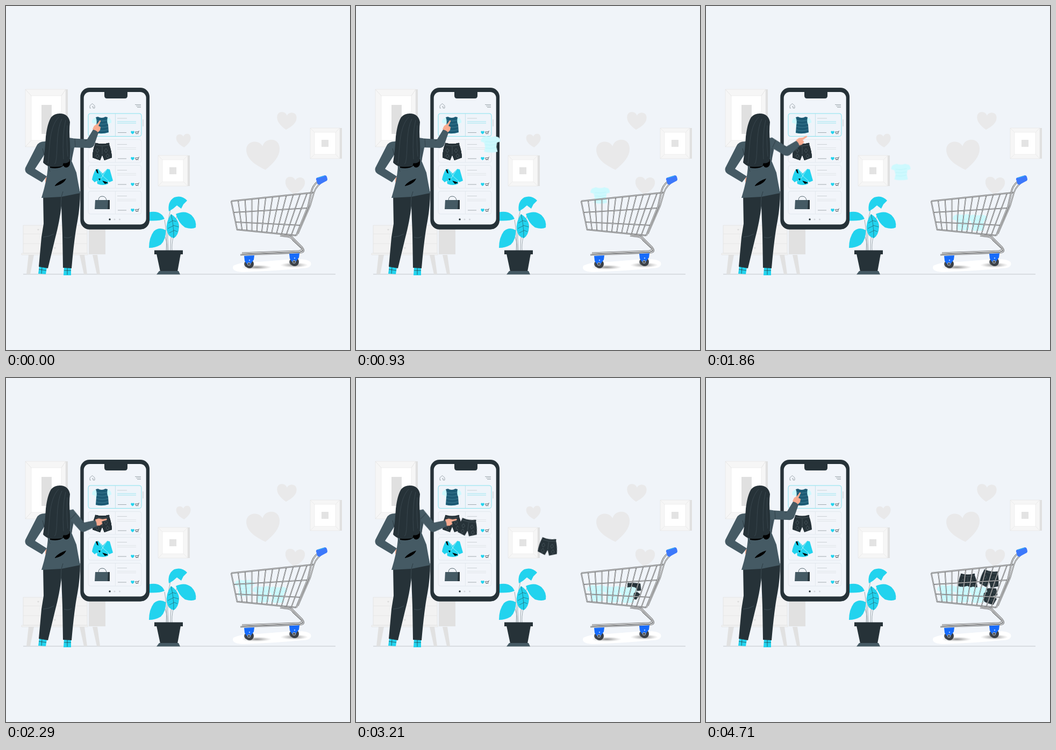
Write an HTML page that moves like this. It is 640x640 px and loops after 6000 ms.

```html
<!DOCTYPE html>
<html lang="en">
<head>
<meta charset="utf-8">
<title>Shopping</title>
<style>
html, body { margin: 0; width: 100%; height: 100%; overflow: hidden; background: #f0f4f9; }
svg { display: block; width: 100vw; height: 100vh; }
.fly, #arm { animation: 6s linear infinite; }
#arm { animation-name: reach; transform-origin: 124px 252px; }
#shirtA { animation-name: shirtA; }
#shirtB { animation-name: shirtB; }
#shirtC { animation-name: shirtC; }
#shortsA { animation-name: shortsA; }
#shortsB { animation-name: shortsB; }
#shortsC { animation-name: shortsC; }

@keyframes reach {
  0%, 19.83% { transform: rotate(0deg); }
  38.33%, 56.67% { transform: rotate(47deg); }
  78.5%, 100% { transform: rotate(0deg); }
}
@keyframes shirtA {
  0% { transform: translate(178px, 222px); }
  5.7% { transform: translate(249px, 256px); }
  10.67% { transform: translate(335px, 295px); }
  14.03% { transform: translate(418px, 336px); }
  15.5% { transform: translate(454px, 352px); }
  22%, 100% { transform: translate(505px, 403px); }
}
@keyframes shirtB {
  0%, 9.8% { transform: translate(178px, 222px); }
  15.5% { transform: translate(250px, 257px); }
  20.47% { transform: translate(335px, 295px); }
  23.83% { transform: translate(418px, 336px); }
  31%, 100% { transform: translate(477px, 402px); }
}
@keyframes shirtC {
  0%, 19.23% { transform: translate(178px, 222px); }
  24.93% { transform: translate(249px, 256px); }
  29.9% { transform: translate(335px, 295px); }
  33.27% { transform: translate(418px, 336px); }
  39.07%, 100% { transform: translate(448px, 400px); }
}
@keyframes shortsA {
  0%, 38.83% { transform: translate(179px, 271px); }
  41.17% { transform: translate(208px, 278px) rotate(8deg); }
  47.33% { transform: translate(357px, 314px) rotate(8deg); }
  49.5% { transform: translate(409px, 325px); }
  53.5% { transform: translate(516px, 395px) rotate(-75deg) scale(.86); }
  54.8%, 100% { transform: translate(528px, 405px) rotate(-80deg) scale(.86); }
}
@keyframes shortsB {
  0%, 45% { transform: translate(179px, 271px); }
  47.33% { transform: translate(208px, 278px) rotate(8deg); }
  53.5% { transform: translate(357px, 314px) rotate(8deg); }
  55.67% { transform: translate(409px, 325px); }
  60%, 100% { transform: translate(487px, 380px); }
}
@keyframes shortsC {
  0%, 51.17% { transform: translate(179px, 271px); }
  53.5% { transform: translate(208px, 278px) rotate(8deg); }
  59.67% { transform: translate(357px, 314px) rotate(8deg); }
  61.83% { transform: translate(409px, 325px); }
  64.33% { transform: translate(474px, 341px); }
  67.5%, 100% { transform: translate(528px, 374px) rotate(9deg); }
}
</style>
</head>
<body>
<svg viewBox="0 0 640 640">
  <defs>
    <path id="heart" d="M0 9C-6 5-10 1-10-4C-10-8-7.500-9.500-5-9.500C-2.500-9.500-.8-8 0-6C.8-8 2.500-9.500 5-9.500C7.500-9.500 10-8 10-4C10 1 6 5 0 9Z"/>
    <g id="shirt">
      <path fill="#cdf9fe" d="M-8-15Q0-12 8-15L15-13Q18-10 18-5L12-3L11 5L13 14Q0 17-12 14L-10 5L-12-3L-18-5Q-18-11-14-13Z"/>
      <path fill="none" stroke="#b4f1f8" stroke-width=".6" d="M-10-5Q0-3 11-6M-10 1Q0 3 11 0M-10 7Q0 9 11 6"/>
    </g>
    <g id="shorts">
      <path fill="#263238" d="M-13-15Q-14-17-11-16Q0-13 11-16Q14-17 13-13Q17-3 18 11L4 16L0 6L-4 16L-18 11Q-18-2-13-15Z"/>
      <path fill="none" stroke="#75848b" stroke-width=".4" d="M-12-12Q0-9 12-12M0-9L0 5M-9-6l3 4-3 4-3-4zM-9 4l3 4-3 4-3-4zM7-6l3 4-3 4-3-4zM10 4l3 4-3 4-3-4z"/>
    </g>
    <g id="frame">
      <path fill="#e0e0e0" d="M54 0h5v57h-5z"/>
      <path fill="#f6f6f6" stroke="#e6e6e6" stroke-width=".7" d="M0 0h55v57h-55z"/>
      <path fill="none" stroke="#e6e6e6" stroke-width=".7" d="M0 0l55 57M55 0L0 57"/>
      <path fill="#fff" stroke="#ebebeb" stroke-width=".7" d="M8 8h39v41h-39z"/>
      <path fill="#e3e3e3" d="M21 22h13v13h-13z"/>
    </g>
    <radialGradient id="shade">
      <stop offset="0" stop-color="#666" stop-opacity=".75"/><stop offset="1" stop-color="#999" stop-opacity="0"/>
    </radialGradient>
  </defs>

  <!-- room -->
  <path fill="#e0e0e0" d="M110 155h5v108h-5z"/>
  <path fill="#f6f6f6" stroke="#e6e6e6" stroke-width=".7" d="M36 155h75v107h-75z"/>
  <path fill="none" stroke="#e0e0e0" stroke-width=".8" d="M36 155l11 12M111 155l-8 12M36 262l11-12M111 262l-8-12"/>
  <path fill="#fff" stroke="#e8e8e8" stroke-width=".7" d="M47 167h56v83h-56z"/>
  <path fill="#e0e0e0" d="M66 184h19v54h-19z"/>
  <use href="#frame" x="283" y="278"/>
  <use href="#frame" x="566" y="227"/>
  <g fill="#e9e9ea">
    <use href="#heart" transform="translate(330.500 251) rotate(-4) scale(1.35)"/>
    <use href="#heart" transform="translate(522 214.500) rotate(4) scale(1.82 1.75)"/>
    <use href="#heart" transform="translate(479.500 278.500) rotate(-7) scale(3.100 2.950)"/>
    <use href="#heart" transform="translate(537.500 335) rotate(4) scale(1.820 1.750)"/>
  </g>
  <path stroke="#d2d6db" stroke-width="1.300" d="M32 499H613"/>
  <path fill="#e1e1e1" d="M154 408h31v54h-31zM42 463h10l-7 36h-7zM137 463h9l5 36h-6zM161 463h9l5 36h-6z"/>
  <path fill="#f2f2f2" stroke="#e2e2e2" stroke-width=".8" d="M29 460h123v3h-123zM32 408h119v52h-119zM32 424h119M32 442h119"/>
  <g fill="#dcdcdc"><circle cx="60" cy="416" r="1.600"/><circle cx="91" cy="450" r="1.600"/></g>

  <!-- plant -->
  <path fill="none" stroke="#6a777e" stroke-width=".6" d="M295 398Q300 425 298 455M306 378Q298 410 302 455M318 391Q305 420 306 455M311 430Q308 445 309 455M293 424Q300 435 300 455"/>
  <g fill="#22d3ee">
    <path d="M303 382Q300 364 313 356Q327 351 337 362L330 369L326 377L318 371Q311 378 303 382Z"/>
    <path d="M316 387Q333 379 345 389Q355 399 353 412Q346 416 333 412Q321 404 316 387Z"/>
    <path d="M262 385Q272 381 283 384Q291 387 295 396Q284 401 262 399Z"/>
    <path d="M266 450Q266 431 275 419Q285 410 297 417Q298 434 288 444Q278 450 266 450Z"/>
    <path d="M307 387Q322 397 322 411Q321 427 312 432Q301 429 299 417Q297 402 307 387Z"/>
  </g>
  <path fill="none" stroke="#263238" stroke-width=".5" d="M307 388Q312 405 312 431M309 399l8 2M309 400l-7 4M311 408l10 3M311 409l-10 5M312 417l7 3M312 418l-8 4"/>
  <path fill="#263238" d="M276 454.500h53v7.500h-53zM280 461h45l-6 33h-32z"/>
  <path fill="#455a64" d="M285 493h36l3 6.500h-44z"/>

  <!-- phone -->
  <rect x="138.300" y="152" width="128.700" height="263.700" rx="17" fill="#263238"/>
  <rect x="144.700" y="160" width="116" height="246.500" rx="11" fill="#f1f5fa"/>
  <path fill="#263238" d="M183 159h43v8q0 5-5 5h-33q-5 0-5-5z"/>
  <path fill="none" stroke="#7b878d" stroke-width=".7" d="M158 190h-2v-4.500l4.500-4 4.500 4v4.500h-3v-3h-2M240 183.500h11M242 186h9M244 188.500h7"/>
  <path stroke="#cdd3d9" stroke-width="1.500" d="M255 211v13"/>
  <g id="cards"></g>
  <circle cx="193" cy="397" r="1.700" fill="#263238"/>
  <g fill="#d4d8de"><circle cx="202" cy="397" r="1.600"/><circle cx="211.500" cy="397" r="1.600"/></g>

  <use href="#shorts" x="179" y="271"/>
  <path fill="#22d3ee" d="M172 303L180 312L188 303L193 304L199 325L192 328L190 325L190 331Q180 335 170 331L169 325L165 328L160 323Q162 312 167 304Z"/>
  <path fill="none" stroke="#fff" stroke-width=".6" d="M172 303L181 317L190 325M188 303L178 319L170 327"/>
  <path d="M167 304l3 0 2 8-3-2zM179 325l7 2 4 2-6 2zM172 321h4l-2 4z"/>
  <path fill="none" stroke="#5d6d75" stroke-width="1" d="M172 362Q172 354 179 354Q186 354 187 362"/>
  <path fill="#455a64" d="M166 361h25v17h-26z"/><path fill="#263238" d="M190 361h3v17h-4z"/>

  <!-- travelling clothes -->
  <use href="#shorts" id="shortsA" class="fly"/>
  <use href="#shorts" id="shortsB" class="fly"/>
  <use href="#shorts" id="shortsC" class="fly"/>
  <use href="#shirt" x="178" y="222"/>
  <use href="#shirt" id="shirtB" class="fly"/>
  <use href="#shirt" id="shirtA" class="fly"/>
  <use href="#shirt" id="shirtC" class="fly"/>
  <path fill="#1c5a74" d="M167 207l4-1q7 4 14 0l4 1q-2 8 1 14l1 14q-12 4-24 1l1-14q2-8-1-15z"/>
  <path fill="none" stroke="#5fa0b4" stroke-width=".5" d="M167 212q11 4 22 0M168 218q11 4 21 0M168 224q11 4 22 0M167 230q11 4 23 0"/>

  <!-- shopper -->
  <path fill="#22d3ee" d="M62 484l14 2-2 13-14-1zM108 486h13v15h-14z"/>
  <path stroke="#263238" stroke-width=".7" fill="none" d="M61 490l14 2M67 485l-1 13M108 492h13M114 487v13"/>
  <path fill="#263238" d="M69 350L138 345Q138 372 133 400Q127 430 122 488L106 487L105 425L103 372Q100 400 91 434L78 488L61 485L66 430L70 405Z"/>
  <path fill="none" stroke="#53646d" stroke-width=".5" d="M103 353l-1 25M69 430q12-1 20-6M108 430q8 3 14-1"/>
  <path fill="#f8ab90" d="M73 319l6-2h8l-1 2-5 1 3 2-3 4-8 2z"/>
  <path fill="#455a64" d="M72 252Q61 252 57 260L36 301Q34 308 40 312L67 328L76 317L54 303L71 277L78 300Q76 325 66 357L103 355L138 348Q134 328 131 310L122 288L127 264Q132 250 124 246L108 244Z"/>
  <path fill="none" stroke="#263238" stroke-width=".7" d="M103 355l3-10M71 277l-3-12M122 288l1-24M78 300l4 8"/>
  <path d="M91 334Q98 325 112 321Q108 331 91 335Z"/>
  <g id="arm">
    <path fill="#f8ab90" d="M161 229l3-6 6-4 4-6q3-1 2 2l-4 8 4 2-1 6-5 5z"/>
    <path fill="#455a64" d="M119 246L151 248L162 230Q168 231 172 236L164 259Q161 265 153 264L121 263Q113 254 119 246Z"/>
    <path fill="none" stroke="#263238" stroke-width=".6" d="M151 248l-4 3M128 247l1 15"/>
  </g>
  <path d="M82 288L119 285Q120 297 116 299Q110 303 107 297Q99 304 82 301Z"/>
  <path fill="#263238" d="M100 200Q116 200 119 216Q117 232 119 255Q120 275 118 289Q112 294 107 292L105 298Q94 300 83 299Q72 296 69 291Q73 265 74 243Q77 218 84 207Q90 200 100 200Z"/>
  <path fill="none" stroke="#53646d" stroke-width=".4" d="M98 207Q84 220 81 260T78 291M104 210Q96 225 95 260T90 294M111 212Q104 240 107 285M114 222Q112 245 115 280"/>

  <!-- cart -->
  <path fill="#fff" d="M423 483Q440 475 470 476L520 472Q560 468 567 477Q570 488 550 488Q500 493 440 495Q418 494 423 483Z"/>
  <ellipse cx="466" cy="486" rx="28" ry="4.500" fill="url(#shade)"/>
  <ellipse cx="536" cy="482" rx="26" ry="5" fill="url(#shade)"/>
  <g id="cart"></g>
  <g id="wheels"></g>
  <path fill="#3d78fb" d="M577 323q-1-3 3-4l13-4q3 0 4 3l1 4q0 3-3 4l-11 6q-4 1-5-2z"/>
  <path fill="none" stroke="#22d3ee" stroke-width=".8" d="M580 320l13-4"/>
</svg>
<script>
const byId = id => document.getElementById(id);

const card = (y, active) => `
  <rect x="153" y="${y}" width="99" height="42.5" rx="4" fill="${active ? '#eef4fa' : '#f2f5fa'}" stroke="${active ? '#7adfed' : '#e0e6ec'}" stroke-width=".9"/>
  <path d="M203.5 ${y}v42" stroke="${active ? '#b9dfe8' : '#dfe6ed'}" stroke-width=".8"/>
  <path d="M207 ${y + 9}h18" stroke="#b9c0c5" stroke-width=".7"/>
  <path d="M207 ${y + 15}h35M207 ${y + 18}h35" stroke="${active ? '#8ce3ef' : '#dde1e5'}" stroke-width=".8"/>
  <path d="M208 ${y + 35.5}h16" stroke="#7f8a90" stroke-width=".7"/>
  <use href="#heart" fill="#22d3ee" transform="translate(235.5 ${y + 35.5}) scale(.32)"/>
  <path d="M240.5 ${y + 33.5}l1 3.5h4l1-3h-5M246.5 ${y + 34}l1-2M242 ${y + 38}h1M245 ${y + 38}h1" fill="none" stroke="#263238" stroke-width=".7"/>`;
byId('cards').innerHTML = [200, 248.5, 296.5, 344.5].map((y, i) => card(y, i === 0)).join('');

// A metal tube: dark edge with a bright core.
const tube = (d, width) => ['#4c4e50', '#f2f2f2'].map((color, i) =>
  `<path d="${d}" fill="none" stroke="${color}" stroke-width="${i ? width * .42 : width}" stroke-linejoin="round"/>`).join('');

const gaps = 12;
let cart = '';
for (let i = 1; i < gaps; i++) {
  const k = i / gaps;
  cart += tube(`M${419 + 154 * k} ${363 - 16 * k}L${430 + 110 * k} ${416 + 11 * k}`, 1.9);
}
cart += tube('M424 384L560 376M427 402L549 408', 1.9)
  + tube('M419 363L430 416L540 427', 2.3)
  + tube('M419 363L573 347', 2.7)
  + tube('M510 427L525 429Q531 430 535 436L550 450Q554 455 545 456L439 460', 3.2)
  + tube('M514 426L530 428L551 449Q558 458 547 459L436 463', 2.6)
  + tube('M540 427L562 373L568 346Q571 333 582 325', 2.8)
  + tube('M543 424L566 371L573 347Q576 337 586 329', 2.4);
byId('cart').innerHTML = cart;

const wheel = (x, y) => `
  <g transform="translate(${x} ${y})">
    <circle cx="-3" cy="1" r="6" fill="#555b62"/>
    <circle cx="1" cy="1" r="8" fill="#3b4046"/>
    <path d="M-9-14L10-15L9-7L5-2L2 3L-4 1L-8-5Z" fill="#176bfa"/>
    <circle cy="1" r="3.2" fill="#8d98a5"/><circle cy="1" r="1.6" fill="#333"/>
    <circle cx="1" cy="-6" r="1.2" fill="#a9ccff"/>
  </g>`;
byId('wheels').innerHTML = wheel(452, 479) + wheel(536, 475);
</script>
</body>
</html>
```
